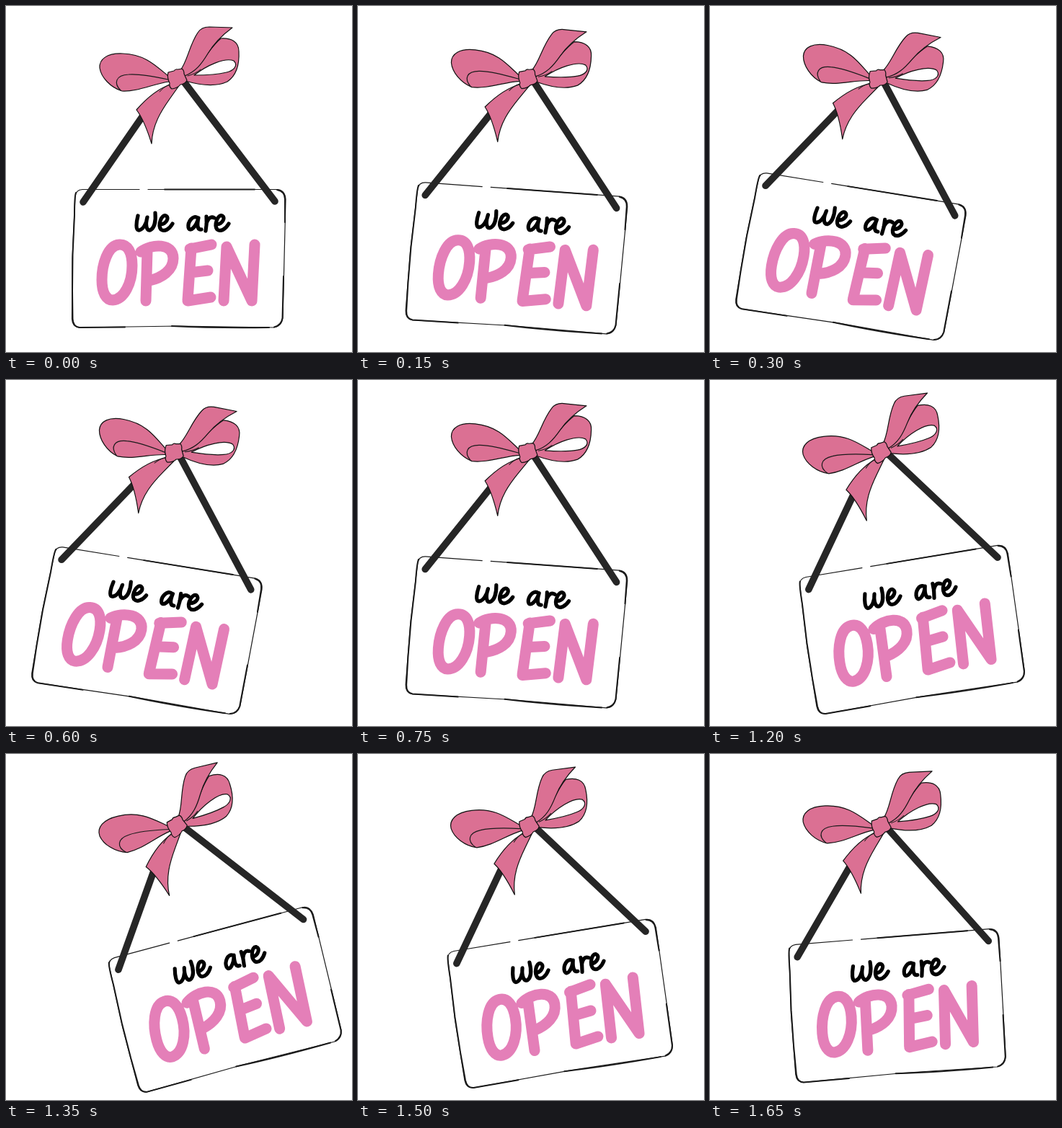
An HTML page that plays this animation: 480x480 px, repeating every 1.8 s.

```html
<!DOCTYPE html>
<html lang="en">
<head>
<meta charset="utf-8">
<title>Swinging sign</title>
<style>
  html, body { margin: 0; width: 100%; height: 100%; overflow: hidden; background: #fff; }
  svg { display: block; width: 100vw; height: 100vh; }
  path { stroke-linecap: round; stroke-linejoin: round; }
  .line { fill: none; stroke: #1a1a1a; }
  .rope { fill: none; stroke: #262626; stroke-width: 9.6; }
  .bow { fill: #db7093; stroke: #111; stroke-width: 1.2; }
  .small { fill: none; stroke: #000; stroke-width: 5.2; }
  .big { fill: none; stroke: #e47fb8; stroke-width: 15; }
</style>
</head>
<body>
<svg viewBox="0 0 480 480" role="img" aria-label="we are OPEN">
  <g id="sign">
    <!-- board -->
    <path class="line" stroke-width="1.2" d="M185 254.500L106 254.500Q97 255 96 264L92 350L91.500 434Q92 445 101 446L240 444L371 446Q382 445 384 433L386 350L388 268Q387 255 376 254.500L197 254.500"/>
    <path class="line" stroke-width="2" d="M97 259Q95 264 95 290L92.500 345L92 395L92.500 434Q93 445 102 446L165 445.500M230 444Q290 447 365 446M372 445.500Q382 443 383.500 433L385 375M376 255Q387 257 387 268L387 300M220 254.500L345 254.500"/>

    <!-- cords -->
    <path class="rope" d="M107 272L206 129M373 271L246 104"/>

    <!-- bow -->
    <g transform="translate(2 1)">
      <path class="bow" d="M226 108C208 114 192 128 179 143C189 156 195 174 200 190C201 164 213 145 225 128L237 111Z"/>
      <path class="bow" d="M223 96C206 82 191 66 160 65C138 64 127 73 128 85C130 98 143 112 159 117C181 118 202 107 224 104Z"/>
      <path class="line" stroke-width="1.2" d="M223 101C200 96 180 93 168 94C150 95 147 106 157 116"/>
      <path class="bow" fill-rule="evenodd" d="M246 95C270 82 279 58 296 44C311 43 321 49 321 62C322 82 317 96 305 104C290 111 268 109 247 103ZM259 95C277 81 302 70 314 75C321 82 313 89 304 91C288 95 274 95 259 95Z"/>
      <path class="bow" d="M240 88C250 75 252 54 264 36Q269 28 280 28L312 29C297 40 287 50 278 65C269 80 261 90 246 96Z"/>
      <path class="bow" d="M223 91L231 89Q233 86 236 87L242 86Q245 88 245 93L249 102Q247 107 240 108Q236 113 228 114Q224 111 225 106Q221 98 223 91Z"/>
      <path class="line" stroke-width="1" d="M224 108Q216 112 211 118M250 96Q261 93 268 87"/>
    </g>

    <!-- lettering -->
    <path class="small" d="M183 291C181 299 179 312 185 311C190 310 195 302 196 293C193 304 195 312 200 311C206 308 208 298 207 287M266 294C259 289 252 300 253 307C255 315 264 306 267 294C265 303 265 311 271 310M278 292Q279 302 277 312M278 302Q282 290 289 294"/>
    <path id="e" class="small" d="M215 303C222 302 227 294 222 291C216 288 210 304 215 310C220 314 227 309 231 302"/>
    <use href="#e" x="78"/>
    <path class="big" d="M157 331C141 332 133 359 133 380C133 398 139 408 148 408C164 407 175 384 175 360C175 342 169 330 157 331M196 340L194 409M187 341C203 329 232 329 232 350C232 367 216 377 199 381M257 336L252 408M255 337L285 331M255 370L280 367M252 409L284 404M302 409L306 334L341 409L345 331"/>
  </g>
</svg>
<script>
  const sign = document.getElementById("sign");
  const STEP = 150;
  const angles = [0, 4.1, 9.2, 13, 9.2, 4.1, 0, -4.6, -9.4, -15, -9.4, -4.6];

  function draw(now) {
    const angle = angles[Math.floor(now / STEP) % angles.length];
    const drift = -0.45 * Math.max(angle, 0);
    sign.setAttribute("transform", `translate(${drift} 0) rotate(${angle} 235 100)`);
    requestAnimationFrame(() => draw(performance.now() - start));
  }

  const start = performance.now();
  draw(0);
</script>
</body>
</html>
```
